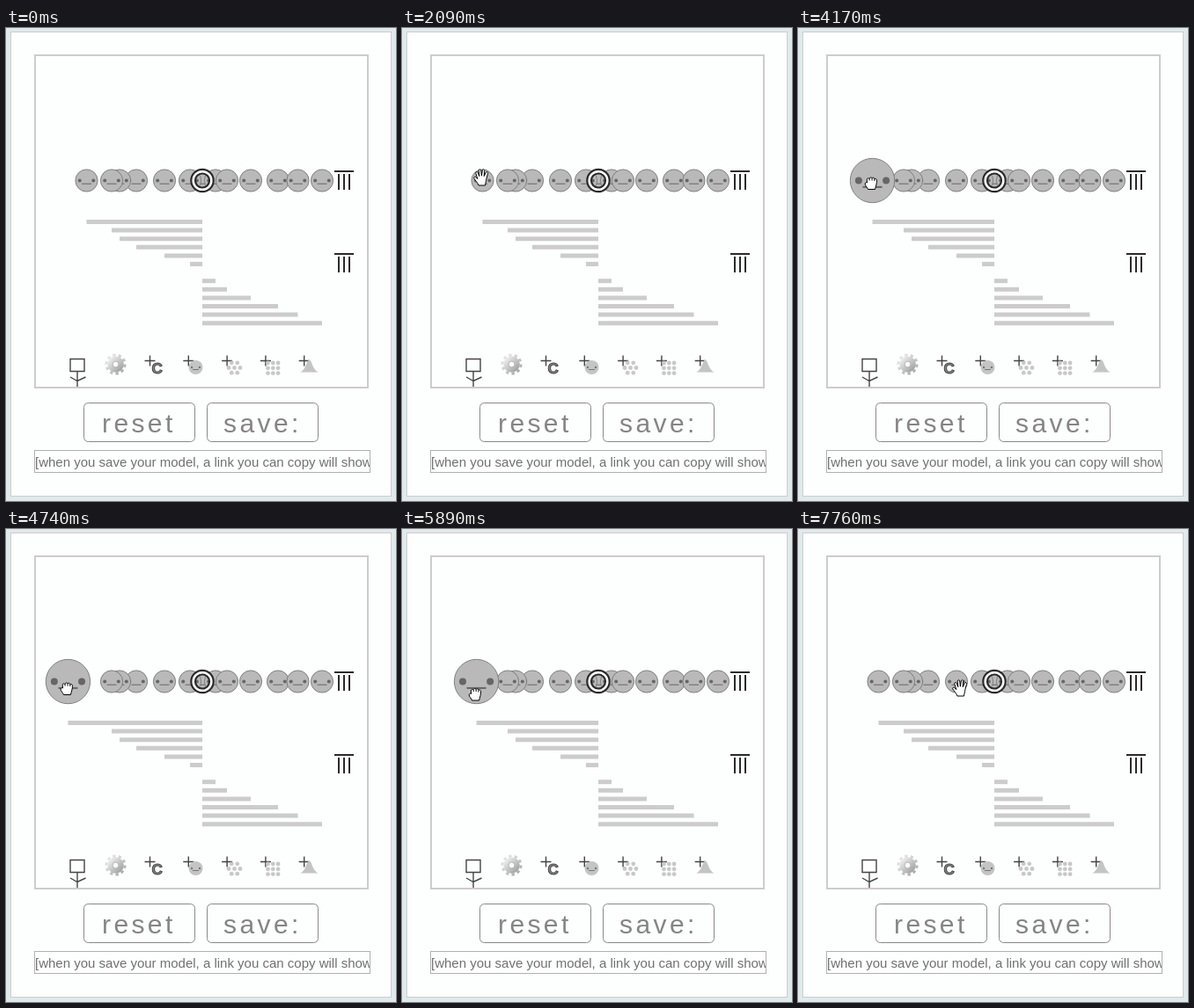
An HTML page that plays this animation: 443 px wide and 538 px high, repeating every 8000 ms.

```html
<!DOCTYPE html>
<html lang="en">
<head>
<meta charset="utf-8">
<style>
  html, body { margin: 0; width: 100%; height: 100%; overflow: hidden; background: #dfeaec; }
  svg { display: block; font-family: Arial, "Liberation Sans", sans-serif; }
  .button { fill: #fdfffe; stroke: #888; }
  .label { font-size: 30px; letter-spacing: 3.4px; fill: #858585; }
  .ink { fill: none; stroke: #2a2a2a; stroke-width: 2; }
  .thin { fill: none; stroke: #444; stroke-width: 1.4; }
  #cursor path { fill: #fff; stroke: #000; stroke-linejoin: round; }
</style>
</head>
<body>
<svg width="443" height="538" viewBox="0 0 443 538">
  <defs>
    <linearGradient id="metal" x2="1" y2="1">
      <stop stop-color="#ececec"/><stop offset="1" stop-color="#a4a4a4"/>
    </linearGradient>
    <clipPath id="inputClip"><rect x="33" y="481" width="380" height="24"/></clipPath>
    <g id="face">
      <circle r="12.6" fill="#b9b9b9" stroke="#777" stroke-width=".9" vector-effect="non-scaling-stroke"/>
      <circle cx="-7.8" r="2" fill="#666"/><circle cx="7.8" r="2" fill="#666"/>
      <path d="M-5.5 3.7H5.5" stroke="#666"/>
    </g>
    <path id="plus" class="thin" d="M-6 0H6M0-6V6"/>
    <path id="bin" class="ink" d="M373 0H395M378 3V21M384 3V21M390 3V21"/>
  </defs>

  <rect x="5.5" y="4.5" width="432" height="528" fill="#fdfffe" stroke="#ccc"/>
  <rect x="33" y="31" width="378" height="378" fill="none" stroke="#ccc" stroke-width="2"/>
  <g id="bars" stroke="#ccc" stroke-width="5"></g>
  <g id="faces"></g>
  <g transform="translate(223 173.5)" fill="none" stroke="#2a2a2a" stroke-width="2.2">
    <circle r="10.3" stroke="#fff" stroke-width="4"/><circle r="12.7"/><circle r="8"/>
  </g>
  <use href="#bin" y="163"/>
  <use href="#bin" y="257"/>

  <path class="thin" d="M73 376.5H89V390.5H73ZM81 390.5V408M73 397L81 401.5L90.5 397"/>
  <g transform="translate(124.5 382.5)" fill="none" stroke="url(#metal)">
    <circle r="10.5" stroke-width="3" pathLength="20" stroke-dasharray="1 1"/>
    <circle r="6.3" stroke-width="6"/>
    <circle r="3.4" stroke="#aaa" stroke-width=".8"/>
  </g>
  <g id="tools"></g>
  <text x="165.5" y="393" font-size="17" font-weight="bold" fill="#888" stroke="#444">C</text>
  <g transform="translate(215.5 386)">
    <circle r="8" fill="#c4c4c4"/>
    <circle cx="-4.5" r="1.2" fill="#777"/><circle cx="4.5" r="1.2" fill="#777"/>
    <path d="M-3.5 2.5H3.5" stroke="#777"/>
  </g>
  <g id="dots" fill="#c8c8c8"></g>
  <path d="M334 391.5C341 389 341.5 377.5 344.5 377.5S348 389 355 391.5Z" fill="#c4c4c4"/>

  <rect class="button" x="88.5" y="426.5" width="126" height="44" rx="5"/>
  <rect class="button" x="228.5" y="426.5" width="126" height="44" rx="5"/>
  <text class="label" x="109" y="460">reset</text>
  <text class="label" x="247" y="460">save:</text>
  <rect x="32.5" y="480.5" width="381" height="25" fill="#fdfffe" stroke="#b0b0b0"/>
  <text x="33" y="499" font-size="15" fill="#707070" clip-path="url(#inputClip)">[when you save your model, a link you can copy will show up here]</text>

  <g id="cursor">
    <path id="arrow" d="M0 0V16L4 12.5L6.5 18.5L9 17.5L6.5 11.7H11.5Z"/>
    <path id="open" transform="translate(-9 -10)" d="M6 19C5 16 2 13 .8 11C0 9.3 2.2 8.6 3.3 10L4.8 11.6L2.8 5.2C2.4 3.3 4.6 2.8 5.2 4.5L6.8 8.6L6.2 2.2C6.2 .3 8.4 .3 8.7 2L9.4 8.2L10.4 1.8C10.8 .2 12.8 .5 12.7 2.4L12.2 8.6L14.3 4.4C15.2 2.8 17 3.6 16.5 5.4L14.8 12C14.5 14 14 16 13.5 19Z"/>
    <path id="fist" transform="translate(-7.5 -8)" d="M4 15C3 12 .5 11 .7 8.5C.8 7 2.5 6.8 3 7.5L2.8 4C2.8 2 5 1.8 5.6 3.2C5.7 1 8.2 1 8.6 2.6C9 1.2 11.2 1.4 11.4 3.4C12 2.4 14 2.8 14 4.8C14.2 8 13 11 12 15ZM5.6 3.2V5M8.6 2.6V5M11.4 3.4V5.5"/>
  </g>
</svg>
<script>
const LOOP = 8000, SAMPLE = 130, HOME = 91.5, MEDIAN = 223, ROW = 173.5;
const ENTER = 680, HOVER = 1970, PRESS = 2750, RELEASE = 6380;
const byId = id => document.getElementById(id);

function add(parent, tag, attrs) {
  const el = document.createElementNS('http://www.w3.org/2000/svg', tag);
  for (const key in attrs) el.setAttribute(key, attrs[key]);
  return byId(parent).appendChild(el);
}

const values = [HOME, 120, 129, 148, 180, 209, MEDIAN, 238, 251, 278, 309, 331.5, 359];
const bars = values.map((x, i) =>
  add('bars', 'path', { d: `M${x} ${220.5 + i * 9.6}H${MEDIAN}` }));

// Faces farther from the median lie on top.
const distance = x => Math.abs(x - MEDIAN);
const faces = new Map(values.toSorted((a, b) => distance(a) - distance(b)).map(x =>
  [x, add('faces', 'use', { href: '#face', transform: `translate(${x} ${ROW})` })]));
const dragged = faces.get(HOME);

for (let i = 0; i < 5; i++) add('tools', 'use', { href: '#plus', x: 163.5 + i * 43.8, y: 378.5 });
const dot = (cx, cy) => add('dots', 'circle', { cx, cy, r: 2.4 });
dot(259.5, 386.5);
for (let i = 0; i < 6; i++) {
  const angle = i * Math.PI / 3;
  dot(259.5 + 6.5 * Math.cos(angle), 386.5 + 6.5 * Math.sin(angle));
}
for (let i = 0; i < 9; i++) dot(297.5 + i % 3 * 5.8, 381 + Math.floor(i / 3) * 5.8);

const progress = (t, from, to) => Math.min(1, Math.max(0, (t - from) / (to - from)));
const mix = (a, b, f) => a + (b - a) * f;
const easeOut = f => 1 - (1 - f) ** 1.6;
const swing = f => (1 - Math.cos(Math.PI * f)) / 2;

// Turning points of the drag: [time, x]
const turns = [
  [3050, HOME], [3600, 60], [4030, 91], [4540, 62], [4990, 89], [5450, 73.5], [6200, HOME]
];
const faceAt = t => turns.reduce((x, [time, turnX], i) =>
  i ? mix(x, turnX, swing(progress(t, turns[i - 1][0], time))) : turnX, HOME);

function pointerAt(t, faceX) {
  if (t < PRESS) {
    const f = easeOut(progress(t, ENTER, 2090));
    return [mix(199, 90, f), mix(508, 170, f)];
  }
  const f = easeOut(progress(t, 7010, 7640));
  return [mix(faceX - 1.5, 184, f), mix(mix(170, 188, swing(progress(t, 3000, 5900))), 181, f)];
}

function draw(now) {
  const t = Math.floor(now % LOOP / SAMPLE) * SAMPLE + 30;
  const dragging = t >= PRESS && t < RELEASE;
  const faceX = faceAt(t);

  dragged.setAttribute('transform', `translate(${faceX} ${ROW}) scale(${dragging ? 2 : 1})`);
  bars[0].setAttribute('d', `M${faceX} 220.5H${MEDIAN}`);

  const shape = t < ENTER ? '' : t < HOVER ? 'arrow' : dragging ? 'fist' : 'open';
  for (const id of ['arrow', 'open', 'fist']) byId(id).style.display = id === shape ? '' : 'none';
  byId('cursor').setAttribute('transform', `translate(${pointerAt(t, faceX)})`);
}

const began = performance.now();
(function tick() {
  draw(performance.now() - began);
  requestAnimationFrame(tick);
})();
</script>
</body>
</html>
```
